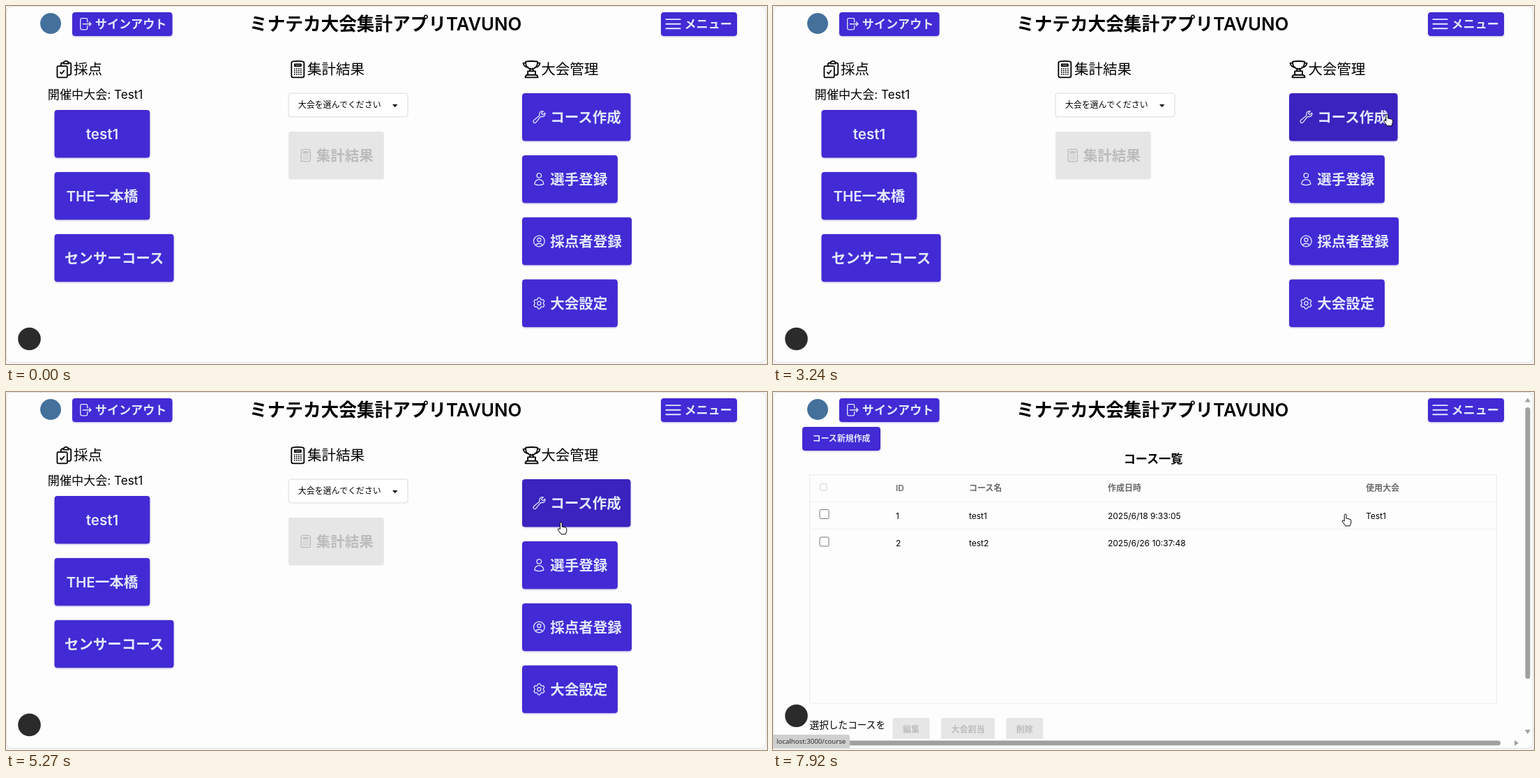
Animation of 1091 by 513 pixels, one loop 7.99 s. Source, as an HTML page:

```html
<!DOCTYPE html>
<html lang="ja">
<head>
<meta charset="utf-8">
<style>
html, body { margin: 0; width: 100%; height: 100%; overflow: hidden; background: #f5f5f5; }
svg { display: block; width: 1091px; height: 513px; }
text { font-family: Inter, "Noto Sans CJK JP", "Noto Sans CJK", sans-serif; white-space: pre; }
#status text { font-family: "Open Sans", "Noto Sans", sans-serif; }
.button { fill: #422ad5; stroke: #3f28ca; filter: drop-shadow(0 1.5px 1px #422ad555); }
.icon { fill: none; stroke-width: 1.5; stroke-linecap: round; stroke-linejoin: round; }
</style>
</head>
<body>
<svg id="stage" viewBox="0 0 1091 513"></svg>
<script>
const LOOP = 7990, ENTER_AT = 640, ORBIT_AT = 2180, HOVER_AT = 1740, STATUS_AT = 5960, PAGE_AT = 7785;
const ZOOM = .855, XL = 30 * ZOOM, L = 24 * ZOOM, M = 20 * ZOOM, S = 14 * ZOOM;
const INK = '#000', ON_PRIMARY = '#e0e7ff', GREY = '#e6e6e6', ON_GREY = '#bcbcbc', BAR = '#a0a0a0';

const times = (n, f) => Array.from({ length: n }, (_, i) => f(i)).join('');
const circle = (cx, cy, r) => `M${cx - r} ${cy}a${r} ${r} 0 1 1 0 .01z`;

// Outline icons on a 24 unit grid
const gear = times(24, i => {
  const tip = i % 4 == 1 || i % 4 == 2, r = tip ? 9.2 : 7.2;
  const a = (Math.floor(i / 4) * 60 + (i % 4 < 2 ? -1 : 1) * (tip ? 10 : 21)) * Math.PI / 180;
  return `${i ? 'L' : 'M'}${12 + r * Math.sin(a)} ${12 - r * Math.cos(a)}`;
});
const ring = (cx, cy, r) => `M${cx - r} ${cy}a${r} ${r} 0 0 1 ${2 * r} 0a${r} ${r} 0 0 1 ${-2 * r} 0`;
const ICONS = {
  exit: 'M16 9V5q0-2-2-2H7Q5 3 5 5v14q0 2 2 2h7q2 0 2-2v-4m3 0 3-3-3-3m3 3H9',
  bars: times(3, i => `M3.75 ${6.75 + i * 5.25}h16.5`),
  clipboard: 'M5 8.25h9.5q1.25 0 1.25 1.25v11q0 1.25-1.25 1.25H5q-1.25 0-1.25-1.25v-11Q3.75 8.25 5 8.25M8.25 8V6q0-2 3-2M17 4q3.25 0 3.25 2v10.5q0 2.25-2 2.25H16M11.25 5.2q0-3 3-3t3 3zM7.5 15.75l1.5 1.5 3-3.75',
  calculator: 'M6.5 2.5q5.5-.6 11 0 2 .3 2 2v15q0 2.25-2 2.25h-11q-2 0-2-2.25v-15q0-1.7 2-2M8.25 6h7.5v2.25h-7.5z' +
    times(16, i => `M${8.25 + i % 4 * 2.5} ${11.25 + Math.floor(i / 4) * 2.25}h.01`),
  trophy: 'M5 2.7q7-.9 14 0v2a7 7 0 0 1-14 0zM5 4.2l-3 .5a6 6 0 0 0 6 5M19 4.2l3 .5a6 6 0 0 1-6 5M10.5 11q0 2-1 3.2m4-3.2q0 2 1 3.2M7.5 18.7v-4.5h9v4.5m-9 0h9q3 0 3 3h-15q0-3 3-3',
  wrench: 'M21.5 5a4.7 4.7 0 0 1-5.5 6.2q-1.5 0-2.3 1l-7 8.6a2.5 2.5 0 1 1-3.6-3.6l8.6-7q1-.8 1-2.3a4.7 4.7 0 0 1 6.2-5.5l-3.3 3.2 2.6 2.6z',
  user: ring(12, 6, 3.75) + 'M4.5 20a7.5 7.5 0 0 1 15 0 18 18 0 0 1-15 0',
  judge: ring(12, 12, 9) + ring(12, 9.75, 3) + 'M6 18.7a7.5 7.5 0 0 1 12 0',
  gear: gear + 'z' + ring(12, 12, 3)
};

// x is the left edge (or the middle with anchor 'middle'); cy is the line's centre
const text = (s, x, cy, size, { fill = INK, weight = 400, anchor = 'start' } = {}) =>
  `<text x="${x}" y="${cy + size * .37}" font-size="${size}" font-weight="${weight}" fill="${fill}" text-anchor="${anchor}">${s}</text>`;
const rect = (x, y, w, h, fill, rx = 3.5, more = '') =>
  `<rect x="${x}" y="${y}" width="${w}" height="${h}" rx="${rx}" fill="${fill}" ${more}/>`;
const path = (d, fill) => `<path d="${d}" fill="${fill}"/>`;
const icon = (name, cx, cy, scale, color = INK) =>
  `<path class="icon" d="${ICONS[name]}" stroke="${color}" transform="translate(${cx} ${cy}) scale(${scale}) translate(-12 -12)"/>`;

const button = (x, y, w, h) => rect(x + .5, y + .5, w - 1, h - 1, '', 3.2, 'class="button"');
const label = (s, x, cy, size, anchor) => text(s, x, cy, size, { fill: ON_PRIMARY, weight: 600, anchor });
const heading = (s, pic, x) => icon(pic, x, 90.7, 1.2) + text(s, x + 13.7, 90.7, L);

const STEP = 104 * ZOOM, TALL = 80 * ZOOM, WIDE = 160 * ZOOM;
const course = (s, i, w = WIDE) => {
  const y = 149 + i * STEP;
  return button(69.5, y, w, TALL) + label(s, 69.5 + w / 2, y + TALL / 2, L, 'middle');
};
const manage = (s, pic, i, w = WIDE) => {
  const y = 125 + i * STEP, cy = y + TALL / 2;
  return button(740, y, w, TALL) + icon(pic, 764.3, cy, .87, ON_PRIMARY) + label(s, 780.2, cy, L);
};
const disabled = (s, x, w) => path(`M${x} 497v-27q0-3 3-3h${w - 6}q3 0 3 3v27z`, GREY) +
  text(s, x + w / 2, 483.5, S, { fill: ON_GREY, weight: 600, anchor: 'middle' });
const box = (cx, cy, size, stroke) => rect(cx - size / 2, cy - size / 2, size, size, '#fff', 2, `stroke="${stroke}"`);

const header =
  path(circle(64, 25, 15), '#44709c') +
  button(95, 9, 143.5, 34) + icon('exit', 113, 25.7, .9, ON_PRIMARY) + label('サインアウト', 127.8, 25.7, M) +
  text('ミナテカ大会集計アプリTAVUNO', 349, 25.7, XL, { weight: 600 }) +
  button(939, 9, 109, 34) + icon('bars', 956.5, 25.7, 1.24, ON_PRIMARY) + label('メニュー', 972.5, 25.7, M);

const home =
  heading('採点', 'clipboard', 83.3) + text('開催中大会: Test1', 59.8, 126.7, M) +
  course('test1', 0) + course('THE一本橋', 1) + course('センサーコース', 2, 171) +
  heading('集計結果', 'calculator', 418.3) +
  rect(405, 125, 171, 34, '#fff', 3.5, 'stroke="#d9d9d9"') + text('大会を選んでください', 418.7, 141.8, S) +
  path('M554 141h7.4l-3.7 4z', INK) +
  rect(405, 180, WIDE, TALL, GREY) + icon('calculator', 429.7, 214, .88, ON_GREY) +
  text('集計結果', 444.7, 214, L, { fill: ON_GREY, weight: 600 }) +
  heading('大会管理', 'trophy', 753.5) +
  `<g id="hot">${manage('コース作成', 'wrench', 0, 155.5)}</g>` + manage('選手登録', 'user', 1) +
  manage('採点者登録', 'judge', 2, 157) + manage('大会設定', 'gear', 3);

const COLUMNS = [176, 281, 480, 850];
const row = (cells, i, style) => cells.map((s, c) => text(s, COLUMNS[c], 137.5 + i * 39.7, S, style)).join('');
const list =
  button(42, 50, 112, 34) + label('コース新規作成', 98, 67, S, 'middle') +
  text('コース一覧', 545, 96, M, { weight: 600, anchor: 'middle' }) +
  rect(52.5, 118.5, 985, 327.5, 'none', 0, 'stroke="#ebebeb"') +
  '<path d="M53 157.5H1037M53 196.5H1037" stroke="#f0f0f0"/>' +
  box(72.3, 136.3, 9.5, '#cfcfcf') + box(73.5, 175, 13, '#767676') + box(73.5, 214.5, 13, '#767676') +
  row(['ID', 'コース名', '作成日時', '使用大会'], 0, { fill: '#6a6a6a', weight: 600 }) +
  row(['1', 'test1', '2025/6/18 9:33:05', 'Test1'], 1) +
  row(['2', 'test2', '2025/6/26 10:37:48'], 2) +
  text('選択したコースを', 52.5, 476.5, 16 * ZOOM) +
  disabled('編集', 171.5, 53) + disabled('大会割当', 241, 77) + disabled('削除', 334.3, 53) +
  rect(1078.5, 22, 7, 389, BAR) + rect(18, 499.5, 1025, 7, BAR) +
  path('M1078 14.5h8l-4-6zM1078 484h8l-4 6zM1063 499v8l6-4z', BAR);

const $ = id => document.getElementById(id);
$('stage').innerHTML =
  rect(.5, .5, 1089, 510, '#fdfdfd', 8, 'stroke="#e2e2e2"') + header +
  `<g id="home">${home}</g><g id="list">${list}</g>` +
  '<circle id="badge" cx="33.5" r="16.3" fill="#2b2b2b"/>' +
  `<g id="status">${path('M0 491h107q3 0 3 3v16.5H0z', '#cfcfcf')}${text('localhost:3000/course', 5, 500.7, 9.7, { fill: '#222' })}</g>` +
  '<path id="cursor" fill="#fff" stroke="#000" stroke-linejoin="round"/>';
const hot = $('hot').querySelector('rect');

const ARROW = 'M.5.5v14l3.3-3.1 2.1 4.8 2-.9-2.1-4.7h4.4z';
const HAND = 'M-2 9.5V1.3a1.4 1.4 0 0 1 2.8 0V6l5 1.1q1.7.5 1.7 2.2v3L6 16.8H-.4l-4-5.6q-1.6-2.2.2-2.5 1.2 0 2.2 1.4z';

// The pointer curves in from below, then circles over the button: time, angle, radius
const ORBIT = [[ORBIT_AT, -4.1, .73], [2400, -3.2, 1], [3240, -.07, 1], [4150, 3.24, 1],
  [5270, 8.13, 1.04], [5620, 8.2, .75], [5820, 7.7, .61], [LOOP, 7.7, .61]];
const mix = (a, b, u) => a + (b - a) * u;
const bend = (a, b, c, u) => mix(mix(a, b, u), mix(b, c, u), u);
function pointer(t) {
  if (t < ORBIT_AT) {
    const u = (t - ENTER_AT) / (ORBIT_AT - ENTER_AT);
    return [bend(1058, 993, 787, u), bend(514, 139, 175, u)];
  }
  const i = ORBIT.findIndex(k => k[0] > t), a = ORBIT[i - 1], b = ORBIT[i];
  const u = (t - a[0]) / (b[0] - a[0]), angle = mix(a[1], b[1], u), r = mix(a[2], b[2], u);
  return [815 + 66 * r * Math.cos(angle), 157 + 30 * r * Math.sin(angle)];
}

const clamp = x => Math.min(Math.max(x, 0), 1);
const show = (id, on) => $(id).setAttribute('display', on ? 'inline' : 'none');

function draw(now) {
  const t = now % LOOP, moved = t >= PAGE_AT, hover = clamp((t - HOVER_AT) / 150);
  show('home', !moved);
  show('list', moved);
  $('badge').setAttribute('cy', moved ? 464 : 477);
  hot.style.fill = `rgb(${mix(66, 58, hover)},${mix(42, 35, hover)},${mix(213, 190, hover)})`;
  hot.style.stroke = hover ? hot.style.fill : '';
  $('status').setAttribute('opacity', clamp((t - STATUS_AT) / 130));
  show('cursor', t >= ENTER_AT);
  $('cursor').setAttribute('d', t > HOVER_AT ? HAND : ARROW);
  $('cursor').setAttribute('transform', `translate(${pointer(t)})`);
  requestAnimationFrame(() => draw(performance.now() - start));
}
const start = performance.now();
draw(0);
</script>
</body>
</html>
```
